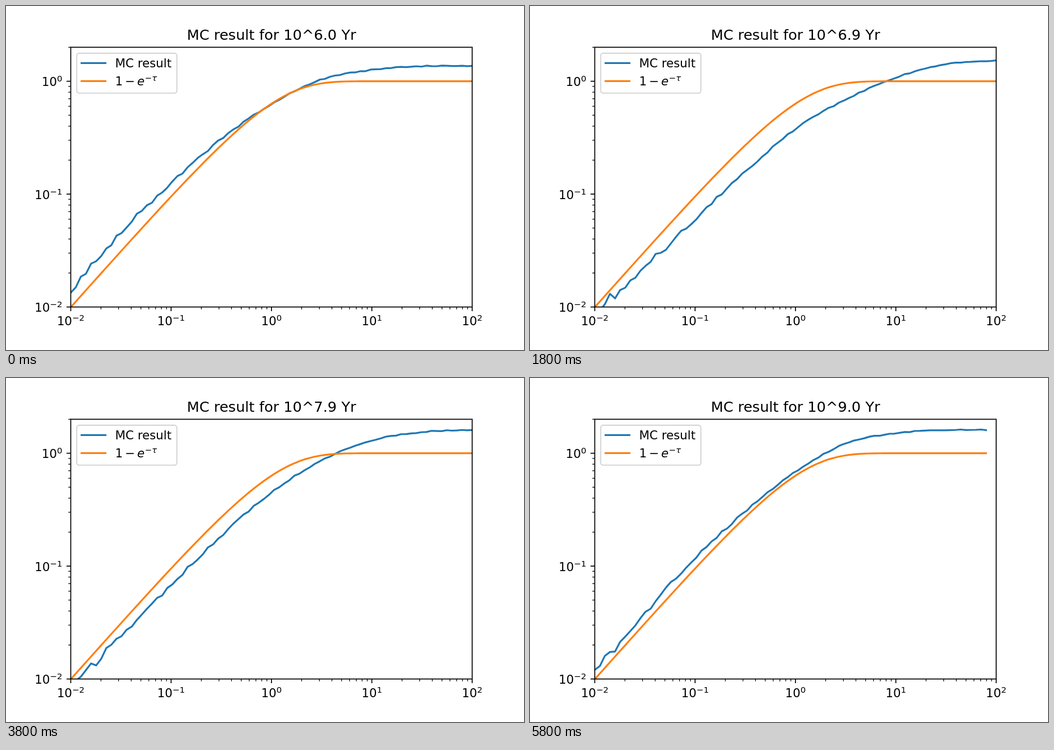
An HTML page that plays this animation: 917x611 px, repeating every 6 s.

```html
<!DOCTYPE html>
<html lang="en">
<head>
<meta charset="utf-8">
<title>MC result</title>
<style>
  html, body { margin: 0; width: 100%; height: 100%; overflow: hidden; background: #fff; }
  svg { display: block; }
  text { font-family: "DejaVu Sans", sans-serif; font-size: 21.2px; fill: #000; white-space: pre; }
  .title { font-size: 25.47px; text-anchor: middle; }
  .sup { font-size: 14.86px; }
  .it { font-style: italic; }
  .curve { fill: none; stroke-width: 3.18; stroke-linejoin: round; stroke-linecap: square; }
  .blue { stroke: #1f77b4; }
  .orange { stroke: #ff7f0e; }
</style>
</head>
<body>
<svg id="stage" width="917" height="611" viewBox="0 0 917 611"></svg>
<script>
const STEP_MS = 200, STEPS = 30;
const L = 114.6, R = 825.3, T = 73.3, B = 534.6;
const DEC_X = (R - L) / 4, DEC_Y = (B - T) / Math.log10(200);
const POINTS = 80, GRID = (R - L) / (POINTS - 1);

// smooth trend of the result: its height at every half decade of x
const trends = [
  { step: 0, ys: [506, 402, 315, 236, 174, 130.5, 113.5, 107, 106] },
  { step: 3, ys: [514, 412, 325, 244, 177, 134.5, 112, 104.5, 103.5] },
  { step: 9, ys: [545, 463, 379, 294, 218, 166, 127, 103.5, 97] },
  { step: 19, ys: [548, 458, 367, 280, 203, 146.5, 111, 96, 92.5] },
  { step: 22, ys: [540, 449, 364, 274, 198, 141, 106, 94, 92.5] },
  { step: 29, ys: [522, 417, 320, 237, 166.5, 116.5, 98, 92.5, 92] }
];

const lerp = (a, b, t) => a + (b - a) * t;

function random(seed) {
  return () => {
    seed = (seed + 0x6D2B79F5) | 0;
    let t = Math.imul(seed ^ (seed >>> 15), 1 | seed);
    t = (t + Math.imul(t ^ (t >>> 7), 61 | t)) ^ t;
    return ((t ^ (t >>> 14)) >>> 0) / 4294967296;
  };
}

function trendAt(step) {
  const at = Math.max(1, trends.findIndex(p => p.step >= step));
  const a = trends[at - 1], b = trends[at];
  const t = (step - a.step) / (b.step - a.step);
  return a.ys.map((y, i) => lerp(y, b.ys[i], t));
}

// Catmull-Rom through the trend's heights
function height(ys, x) {
  const n = ys.length - 1, u = (x - L) / (DEC_X / 2);
  const k = Math.min(Math.floor(u), n - 1), t = u - k;
  const b = ys[k], c = ys[k + 1];
  const a = k ? ys[k - 1] : 2 * b - c;
  const d = k + 2 <= n ? ys[k + 2] : c;
  return b + t / 2 * (c - a + t * (2 * a - 5 * b + 4 * c - d + t * (3 * (b - c) + d - a)));
}

// counting noise: the smaller the value, the stronger the scatter
const scatter = (y, rnd) => (rnd() * 2 - 1) * 8 * Math.exp((y - 500) / 174);

function exact(x) {
  const tau = 10 ** ((x - L) / DEC_X - 2);
  return B - DEC_Y * (2 + Math.log10(1 - Math.exp(-tau)));
}

const label = step => (Math.floor((6 + step * 3 / 29) * 10 + 1e-6) / 10).toFixed(1);
const toPath = (xs, f) => "M" + xs.map(x => `${x.toFixed(2)} ${f(x).toFixed(2)}`).join("L");

const scenes = Array.from({ length: STEPS }, (_, step) => {
  const rnd = random(step * 977 + 5), ys = trendAt(step);
  const count = step === STEPS - 1 ? POINTS - 2 : POINTS;
  const xs = Array.from({ length: count }, (_, i) => L + i * GRID);
  const result = x => {
    const y = height(ys, x);
    return y + scatter(y, rnd);
  };
  return {
    title: `MC result for 10^${label(step)} Yr`,
    blue: toPath(xs, result),
    orange: toPath(xs, exact)
  };
});

const stage = document.getElementById("stage");
function add(name, attrs, content = "", parent = stage) {
  const el = document.createElementNS("http://www.w3.org/2000/svg", name);
  for (const key in attrs) el.setAttribute(key, attrs[key]);
  el.textContent = content;
  return parent.appendChild(el);
}

const write = (x, y, str, cls = "") => add("text", { x, y, class: cls }, str);
const line = (x1, y1, x2, y2, width) =>
  add("line", { x1, y1, x2, y2, stroke: "#000", "stroke-width": width });

function power(x, y, exp) {
  write(x, y, "10");
  write(x + 27, y - 8.1, String(exp).replace("-", "\u2212"), "sup");
}
const powerWidth = exp => exp < 0 ? 48.9 : 36.4;

add("rect", { width: 917, height: 611, fill: "#fff" });
const clip = add("clipPath", { id: "plot" });
add("rect", { x: L, y: T, width: R - L, height: B - T }, "", clip);

// ticks
for (let e = -2; e <= 2; e++) {
  const x = L + (e + 2) * DEC_X, y = B - (e + 2) * DEC_Y;
  line(x, B, x, B + 7.43, 1.7);
  power(x - powerWidth(e) / 2, 567, e);
  if (e <= 0) {
    line(L - 7.43, y, L, y, 1.7);
    power(99.7 - powerWidth(e), y + 8.8, e);
  }
  for (let m = 2; m < 10; m++) {
    const mx = x + Math.log10(m) * DEC_X, my = y - Math.log10(m) * DEC_Y;
    if (mx < R) line(mx, B, mx, B + 4.25, 1.27);
    if (my > T - 0.5) line(L - 4.25, my, L, my, 1.27);
  }
}

const plot = add("g", { "clip-path": "url(#plot)" });
const blue = add("path", { class: "curve blue" }, "", plot);
const orange = add("path", { class: "curve orange" }, "", plot);
add("rect", { x: L, y: T, width: R - L, height: B - T, fill: "none", stroke: "#000", "stroke-width": 1.7 });
const title = write((L + R) / 2, 60.4, "", "title");

// legend
add("rect", {
  x: 125.2, y: 83.9, width: 177.3, height: 70.8, rx: 4.2,
  fill: "#fff", "fill-opacity": 0.8, stroke: "#ccc", "stroke-opacity": 0.8, "stroke-width": 2.1
});
add("path", { class: "curve blue", d: "M133.7 101.3H176.1" });
add("path", { class: "curve orange", d: "M133.7 133.4H176.1" });
write(193.2, 109, "MC result");
write(193.2, 141, "1");
write(210.8, 141, "\u2212");
write(232.2, 141, "e", "it");
write(245.8, 132.9, "\u2212", "sup");
write(258.3, 132.9, "\u03c4", "sup it");

let shown = -1;
function draw(now) {
  const step = Math.floor(now / STEP_MS) % STEPS;
  if (step === shown) return;
  shown = step;
  const scene = scenes[step];
  title.textContent = scene.title;
  blue.setAttribute("d", scene.blue);
  orange.setAttribute("d", scene.orange);
}

const start = performance.now();
function tick() {
  draw(performance.now() - start);
  requestAnimationFrame(tick);
}
tick();
</script>
</body>
</html>
```
